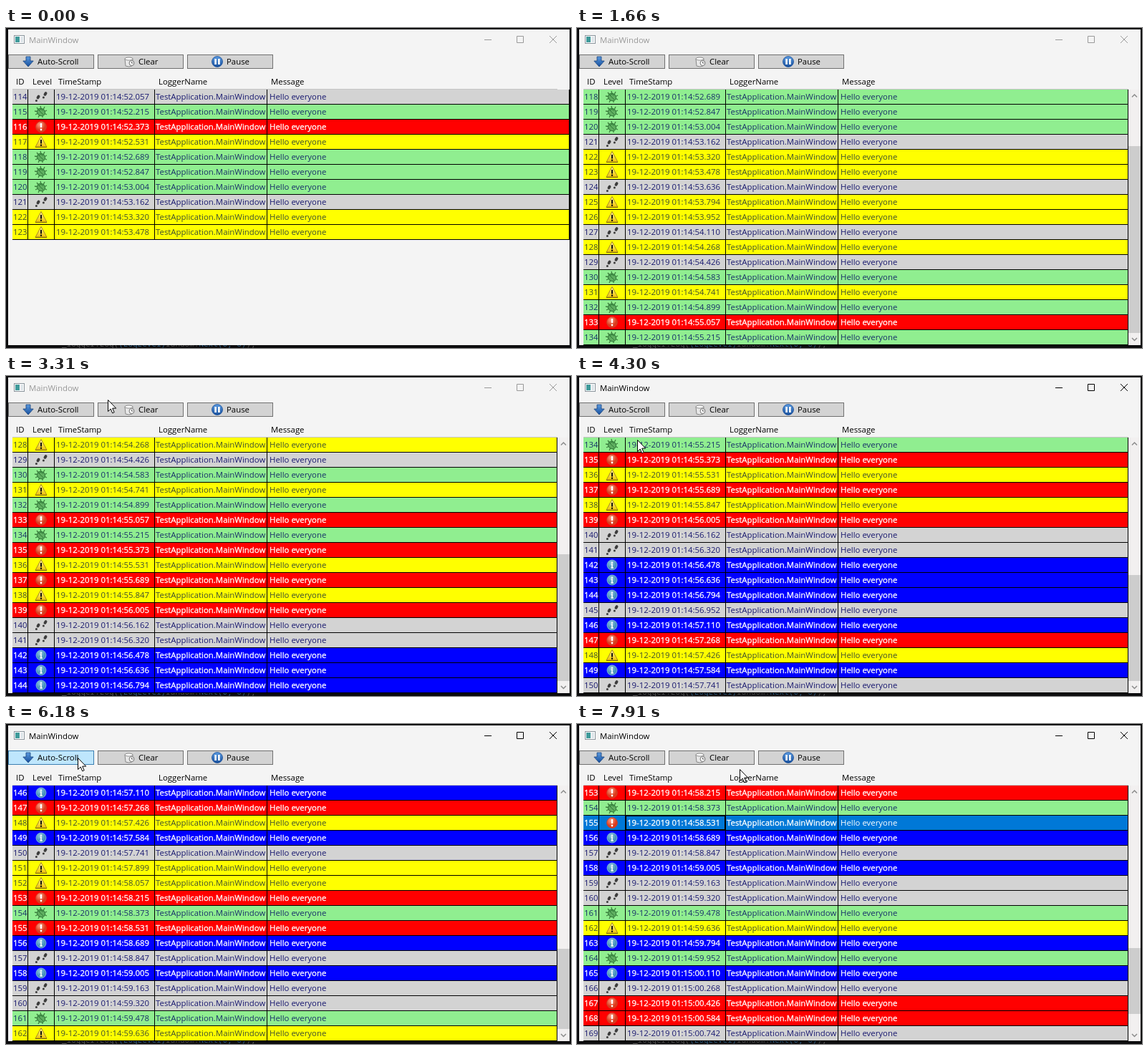
Recreate the animation shown at these times as an HTML page. Size 789 px wide and 447 px high, loop 8 s.

```html
<!DOCTYPE html>
<html lang="en">
<head>
<meta charset="utf-8">
<title>MainWindow</title>
<style>
html, body { margin: 0; width: 100%; height: 100%; overflow: hidden; background: #0c0c0e; }
body { position: relative; font: 11.4px/20px "Open Sans", "Noto Sans", sans-serif; color: #000; cursor: default; }
div, span, svg { position: absolute; white-space: pre; }
svg { top: 0; left: 0; }
.code { left: 78px; top: 431px; font: 11px/20px "Noto Sans Mono", monospace; color: #555; }
.code b { font-weight: 400; color: #2f5f85; }
#stage { left: 0; top: 0; width: 789px; height: 447px; overflow: hidden; }
#win { left: 3px; top: 2px; width: 784px; height: 441px; background: #f4f4f4; }
#bar { left: 0; top: 0; color: #999; }
#bar.active { color: #000; }
#bar svg { left: 660px; top: 4px; }
.btn { top: 37px; width: 118px; height: 18px; line-height: 18px; background: #d3d3d3; border: 1px solid #707070; }
.btn.hover { background: #bee6fd; border-color: #3c7fb1; }
.btn svg { top: 1px; }
.btn span { top: 0; }
.head { top: 65px; }
#rule { left: 9px; top: 85px; width: 761px; height: 1px; background: #c4c4c4; }
#view { left: 9px; top: 86px; overflow: hidden; }
#list { left: 0; top: 0; width: 100%; }
.row { left: 0; width: 100%; height: 20px; border-bottom: 1px solid #000; }
.row i { position: absolute; top: 0; width: 1px; height: 20px; background: #000; }
.row span { top: 0; }
.row svg { left: 30px; }
.T { background: #d3d3d3; color: #191970; }
.D { background: #90ee90; color: #17306a; }
.W { background: #ff0; color: #3f4f2f; }
.E { background: #f00; color: #fff; }
.I { background: #00f; color: #fff; }
.E span, .I span, .sel span { -webkit-text-stroke: .3px #fff; }
.sel { background: #0078d7; }
.sel span { color: #fff; }
.sel .msg { color: inherit; -webkit-text-stroke: 0; }
.box { display: none; left: 58px; top: -1px; width: 137px; height: 18px; border: 2px solid #000; }
.sel .box { display: block; }
#vbar { left: 770px; top: 86px; width: 17px; background: #f2f0f0; }
#hbar { left: 9px; top: 426px; width: 761px; height: 17px; background: #f2f0f0; }
.thumb { background: #cdcdcd; }
#vthumb { left: 0; width: 17px; }
#hthumb { left: 17px; top: 0; width: 711px; height: 17px; }
.chev { fill: none; stroke: #8c8c8c; stroke-width: 1.5; }
.chev.down { top: auto; bottom: 0; }
.chev.right { left: auto; right: 0; }
</style>
</head>
<body>
<svg width="0" height="0">
  <defs>
    <radialGradient id="red" cx=".4" cy=".3"><stop offset="0" stop-color="#ffa088"/><stop offset="1" stop-color="#dc3a1c"/></radialGradient>
    <radialGradient id="teal" cx=".4" cy=".3"><stop offset="0" stop-color="#8cc6e0"/><stop offset="1" stop-color="#4590bc"/></radialGradient>
    <linearGradient id="gold" x2="0" y2="1"><stop offset="0" stop-color="#fff3a0"/><stop offset="1" stop-color="#f0c400"/></linearGradient>
    <linearGradient id="blue" x2="0" y2="1"><stop offset="0" stop-color="#5a9ae0"/><stop offset="1" stop-color="#174f9c"/></linearGradient>
    <g id="foot" fill="#3c3c3c">
      <ellipse rx="3" ry="2" transform="rotate(-60)"/><circle cx="-2.600" cy="5" r="1.500"/>
    </g>
  </defs>
  <symbol id="T" viewBox="0 0 20 20">
    <use href="#foot" x="6" y="10.500"/><use href="#foot" x="16" y="6"/>
  </symbol>
  <symbol id="D" viewBox="0 0 20 20">
    <path d="M4 4l3 4M9 2l1 4M15 3l-2 4M1 9l5 1M2 14l4-2M6 18l2-4M12 18v-4M18 8l-4 2M18 14l-4-2" stroke="#3d7d3d" stroke-width="1.300"/>
    <ellipse cx="10" cy="10.500" rx="5.800" ry="5" fill="#5fae60" stroke="#2f7a38" transform="rotate(35 10 10.500)"/>
    <path d="M6 8q4-3 7 0M7 8l6 6" fill="none" stroke="#2f7a38"/>
  </symbol>
  <symbol id="W" viewBox="0 0 20 20">
    <path d="M10 2.500L18 17.200H2z" fill="url(#gold)" stroke="#a88a20" stroke-linejoin="round"/>
    <path d="M2 17.500h16" stroke="#7d6614"/>
    <path d="M10 7v5.400" stroke="#111" stroke-width="2"/><circle cx="10" cy="14.800" r="1.200" fill="#111"/>
  </symbol>
  <symbol id="E" viewBox="0 0 20 20">
    <circle cx="10" cy="10" r="7.500" fill="url(#red)" stroke="#c8442c" stroke-width=".7"/>
    <path d="M10 5v6" stroke="#fff" stroke-width="2.400"/><circle cx="10" cy="14" r="1.400" fill="#fff"/>
  </symbol>
  <symbol id="I" viewBox="0 0 20 20">
    <circle cx="10" cy="10" r="7" fill="url(#teal)" stroke="#8fc4dc" stroke-width=".8"/>
    <circle cx="10" cy="6.600" r="1.200" fill="#fff"/><path d="M8.600 9H10v5M8.300 14h3.600" fill="none" stroke="#fff" stroke-width="1.600"/>
  </symbol>
</svg>

<div id="stage">
  <div class="code">_logger.Log(<b>(LogLevel)</b>random.<b>Next(0, 6)</b>);</div>
  <div id="win"></div>

  <svg style="left:11px;top:10px" width="15" height="12">
    <rect x=".5" y=".5" width="14" height="11" fill="#fff" stroke="#8a949c"/>
    <rect x="2" y="2" width="6" height="8" fill="#3f9a9a"/><rect x="9" y="2" width="4" height="8" fill="#dfe6ea"/>
  </svg>
  <div id="bar">
    <span style="left:32px;top:7px">MainWindow</span>
    <svg width="120" height="24" fill="none" stroke="currentColor">
      <path d="M8 12.500h10M53.500 7.500h9v9h-9zM99 7l10 10M109 7l-10 10"/>
    </svg>
  </div>

  <div class="btn" id="auto" style="left:3px">
    <svg style="left:19px" width="16" height="16"><path d="M5 1h6v6h4.200L8 15 .8 7H5z" fill="url(#blue)" stroke="#163f7c" stroke-width=".8"/></svg>
    <span style="left:40px">Auto-Scroll</span>
  </div>
  <div class="btn" style="left:128px">
    <svg style="left:35px" width="17" height="16">
      <path d="M2 4l1 10q5 2 9 0l1-10z" fill="#e8e8e8" stroke="#888"/><ellipse cx="7.500" cy="4" rx="5.500" ry="2" fill="#fafafa" stroke="#888"/>
      <circle cx="11.500" cy="10" r="3.500" fill="#f6f6f6" stroke="#777"/><path d="M11.500 8v2h2" fill="none" stroke="#666"/>
    </svg>
    <span style="left:56px">Clear</span>
  </div>
  <div class="btn" style="left:253px">
    <svg style="left:33px" width="16" height="16">
      <circle cx="8" cy="8" r="7.500" fill="url(#blue)" stroke="#1a4f98" stroke-width=".8"/><path d="M5.600 4v8M10.400 4v8" stroke="#fff" stroke-width="2.600"/>
    </svg>
    <span style="left:54px">Pause</span>
  </div>

  <span class="head" style="left:14px">ID</span>
  <span class="head" style="left:37px">Level</span>
  <span class="head" style="left:73px">TimeStamp</span>
  <span class="head" style="left:213px">LoggerName</span>
  <span class="head" style="left:370px">Message</span>

  <div id="rule"></div>
  <div id="view"><div id="list"></div></div>

  <div id="vbar">
    <svg class="chev" width="17" height="17"><path d="M5 10.500L8.500 7l3.500 3.500"/></svg>
    <div id="vthumb" class="thumb"></div>
    <svg class="chev down" width="17" height="17"><path d="M5 7l3.500 3.500L12 7"/></svg>
  </div>
  <div id="hbar">
    <svg class="chev" width="17" height="17"><path d="M10.500 5L7 8.500l3.500 3.500"/></svg>
    <div id="hthumb" class="thumb"></div>
    <svg class="chev right" width="17" height="17"><path d="M7 5l3.500 3.500L7 12"/></svg>
  </div>

  <svg id="mouse" width="14" height="21">
    <path d="M.5.5v16l3.700-3.500 2.500 5.800 2.500-1.100-2.500-5.600h5z" fill="#fff" stroke="#000"/>
  </svg>
</div>

<script>
const $ = id => document.getElementById(id);
const LOOP = 8000, TICK = 109.8, FIRST = 114, ROW = 21, FITS = 17;

// one letter per row: Trace, Debug, Warning, Error, Info
const levels = "TDEWDDDTWWTWWTWTDWDEDEWEWETTIIITIEWITWWEDEITITTDWIDITEETDWTIW";

// rows are logged at a steady pace; ten are there from the start
const loggedAt = i => Math.round(57 + 157.9 * i);
const shownAt = i => i < 10 ? 0 : Math.max(200, 160 * i - 1625);

// pointer stops: time, x, y
const path = [[3080, 232, 11], [3410, 96, 44], [3950, 82, 52], [4280, 84, 88],
  [4740, 99, 157], [5080, 99, 140], [5380, 102, 74], [5600, 99, 46],
  [6370, 100, 48], [6590, 103, 84], [7250, 116, 135], [7905, 227, 63]];

// clicking a row halts scrolling, the button resumes it
const picks = [
  { from: 4740, to: 5700, id: 140, last: 153 },
  { from: 7250, to: LOOP, id: 155, last: 169 }
];

const pad = (n, w) => String(n).padStart(w, "0");
function stampText(ms) {
  const all = 14 * 60000 + 52000 + ms;
  return `19-12-2019 01:${pad(Math.floor(all / 60000), 2)}:${pad(Math.floor(all / 1000) % 60, 2)}.${pad(all % 1000, 3)}`;
}

const cell = (x, text, cls = "") => `<span class="${cls}" style="left:${x}px">${text}</span>`;
const lines = [21, 58, 198, 355].map(x => `<i style="left:${x}px"></i>`).join("") + '<i style="right:0"></i>';

const rows = [...levels].map((level, i) => {
  const el = document.createElement("div");
  el.style.top = i * ROW + "px";
  el.className = "row " + level;
  el.innerHTML = cell(1, FIRST + i) +
    `<svg width="20" height="20"><use href="#${level}"/></svg>` +
    cell(61, stampText(loggedAt(i))) + cell(200, "TestApplication.MainWindow") +
    cell(359, "Hello everyone", "msg") + lines + '<div class="box"></div>';
  $("list").append(el);
  return el;
});

const px = (id, prop, value) => $(id).style[prop] = value + "px";
const show = (id, on) => $(id).style.display = on ? "" : "none";

function pointer(t) {
  const n = path.findIndex(p => p[0] > t);
  if (n === 0) return null;
  if (n < 0) return path[path.length - 1].slice(1);
  const [t0, x0, y0] = path[n - 1], [t1, x1, y1] = path[n];
  const k = (t - t0) / (t1 - t0);
  return [Math.round(x0 + (x1 - x0) * k), Math.round(y0 + (y1 - y0) * k)];
}

function drawGrid(t) {
  const count = rows.filter((_, i) => shownAt(i) <= t).length;
  const pick = picks.find(p => t >= p.from && t < p.to);
  const vbar = count > FITS;
  const hbar = count === FITS + 1 && t < 1200; // until the columns refit
  const height = hbar ? 340 : 357, track = height - 35;
  const total = count * ROW;
  const bottom = pick ? (pick.last - FIRST + 1) * ROW : total;
  const scroll = Math.max(0, bottom - height);

  rows.forEach((el, i) => {
    el.style.display = i < count ? "" : "none";
    el.classList.toggle("sel", !!pick && pick.id === FIRST + i);
  });
  px("view", "width", vbar ? 761 : 778);
  px("view", "height", height);
  px("list", "top", -scroll);
  show("hbar", hbar);
  show("vbar", vbar);
  px("vbar", "height", height);
  px("vthumb", "top", 18 + scroll / total * track);
  px("vthumb", "height", height / total * track);
}

function draw(time) {
  const t = Math.max(0, Math.floor((time - 4) / TICK) * TICK + 4);
  drawGrid(t);
  $("bar").className = t >= 3510 ? "active" : "";
  const spot = pointer(t);
  const [x, y] = spot || [-50, -50];
  show("mouse", spot);
  px("mouse", "left", x - 0.5);
  px("mouse", "top", y - 0.5);
  $("auto").classList.toggle("hover", x >= 3 && x < 123 && y >= 37 && y < 57);
}

const start = performance.now();
function tick() {
  draw((performance.now() - start) % LOOP);
  requestAnimationFrame(tick);
}
tick();
</script>
</body>
</html>
```
